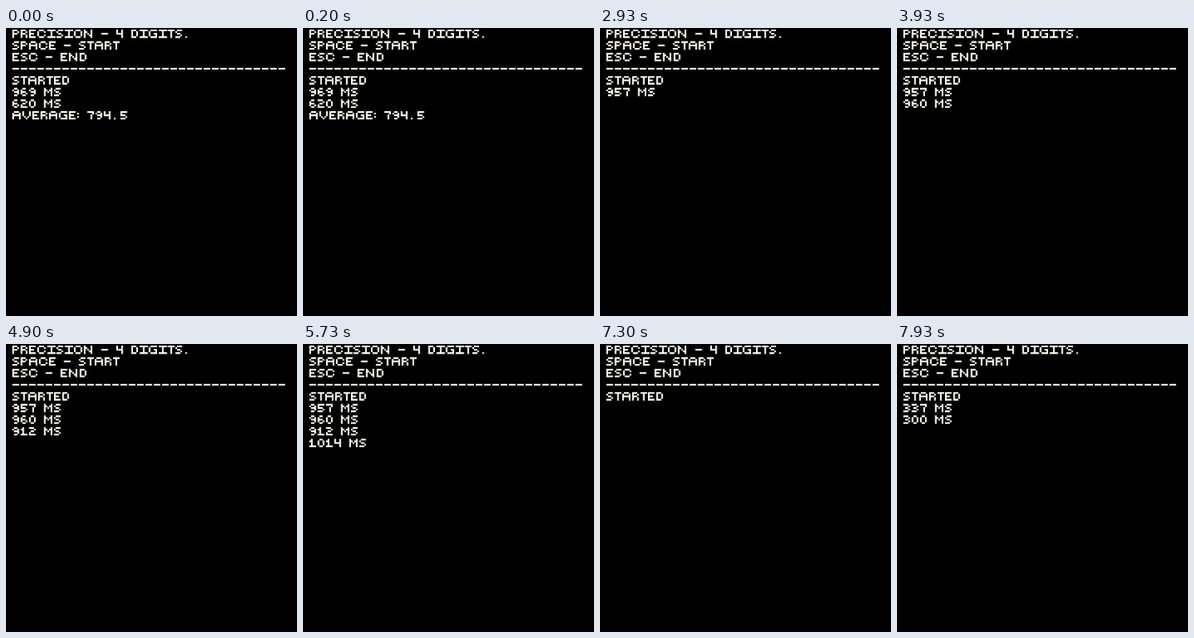
These frames come from a looping animation (364 by 360 pixels, 8000 ms). An HTML page with a canvas:

```html
<!DOCTYPE html>
<html lang="en">
<head>
<meta charset="utf-8">
<title>Reaction timer</title>
<style>
html, body { margin: 0; width: 100%; height: 100%; overflow: hidden; background: #000; }
canvas { display: block; width: 364px; height: 360px; }
</style>
</head>
<body>
<canvas width="364" height="360"></canvas>
<script>
const LOOP = 8000, UNIT = 2.08, ROW = 7, LEFT = 8, TOP = 2;
const INK = '#fffff0';

// Each glyph: advance in units, then strokes one unit thick.
const glyphs = {
  A: [6, 'M0 4V1M1 0H3M4 1V4M0 2H4'],
  C: [6, 'M1 0H3M4 1h.01M0 1V3M4 3h.01M1 4H3'],
  D: [5, 'M2 0H0V4H2M3 1V3'],
  E: [5, 'M3 0H0V4H3M0 2H2'],
  G: [6, 'M4 0H1M0 1V3M1 4H4V2H3'],
  I: [5.5, 'M0 0H4M2 0V4M0 4H4'],
  M: [6, 'M0 4V0M1 1h.01M2 2h.01M3 1h.01M4 0V4'],
  N: [6.5, 'M0 4V0M1 1h.01M2 2h.01M3 3h.01M4 0V4'],
  O: [6, 'M1 0H3M4 1V3M3 4H1M0 3V1'],
  P: [5, 'M0 4V0H2M3 1h.01M0 2H2'],
  R: [5, 'M0 4V0H2M3 1h.01M0 2H2M3 3V4'],
  S: [5, 'M3 0H1M0 1h.01M1 2H2M3 3h.01M2 4H0'],
  T: [4.5, 'M0 0H3M1.5 0V4'],
  V: [6, 'M0 0V2M1 3h.01M2 4h.01M3 3h.01M4 2V0'],
  0: [5, 'M1 0H2M3 1V3M2 4H1M0 3V1'],
  1: [5, 'M0 1h.01M1 0V4M0 4H3'],
  2: [5, 'M0 0H2M3 1h.01M1 2H2M0 3V4H3'],
  3: [5, 'M0 0H2M3 1h.01M1 2H2M3 3h.01M2 4H0'],
  4: [5, 'M0 0V2H3M3 0V4'],
  5: [5, 'M3 0H0V2H2M3 3h.01M2 4H0'],
  6: [5, 'M2 0H1M0 1V3M1 2H2M3 3h.01M2 4H1'],
  7: [5, 'M0 0H3V1M2 2V4'],
  8: [5, 'M1 0H2M0 1h.01M3 1h.01M1 2H2M0 3h.01M3 3h.01M1 4H2'],
  9: [5, 'M1 0H2M0 1h.01M1 2H2M3 1V3M2 4H1'],
  '-': [5, 'M0 2H3'],
  '.': [5, 'M1 4h.01'],
  ':': [2, 'M0 1h.01M0 3h.01'],
  ' ': [4, '']
};
for (const glyph of Object.values(glyphs)) glyph[1] = new Path2D(glyph[1]);

const header = ['PRECISION - 4 DIGITS.', 'SPACE - START', 'ESC - END', '-'.repeat(33), 'STARTED'];

// Every run clears the screen, then prints its lines at the given times.
const runs = [
  { start: 0, lines: [[0, '969 MS'], [0, '620 MS'], [0, 'AVERAGE: 794.5']] },
  { start: 1800, lines: [[2770, '957 MS'], [3730, '960 MS'], [4670, '912 MS'],
                         [5700, '1014 MS'], [6370, 'AVERAGE: 960.8']] },
  { start: 7300, lines: [[7630, '337 MS'], [7930, '300 MS']] }
];

const canvas = document.querySelector('canvas');
const ctx = canvas.getContext('2d');

function drawLine(text, row) {
  ctx.save();
  ctx.translate(LEFT, TOP + row * ROW * UNIT);
  ctx.scale(UNIT, UNIT);
  ctx.translate(0.5, 0.5);
  for (const char of text) {
    const [advance, path] = glyphs[char];
    ctx.stroke(path);
    ctx.translate(advance, 0);
  }
  ctx.restore();
}

function visibleLines(time) {
  const run = runs.findLast(({ start }) => start <= time);
  return [...header, ...run.lines.filter(([at]) => at <= time).map(([, text]) => text)];
}

function render() {
  const lines = visibleLines(performance.now() % LOOP);
  ctx.fillStyle = '#000';
  ctx.fillRect(0, 0, canvas.width, canvas.height);
  ctx.strokeStyle = INK;
  ctx.lineWidth = 1;
  ctx.lineCap = 'square';
  lines.forEach(drawLine);
  canvas.textContent = lines.join('\n');
  requestAnimationFrame(render);
}
render();
</script>
</body>
</html>
```
